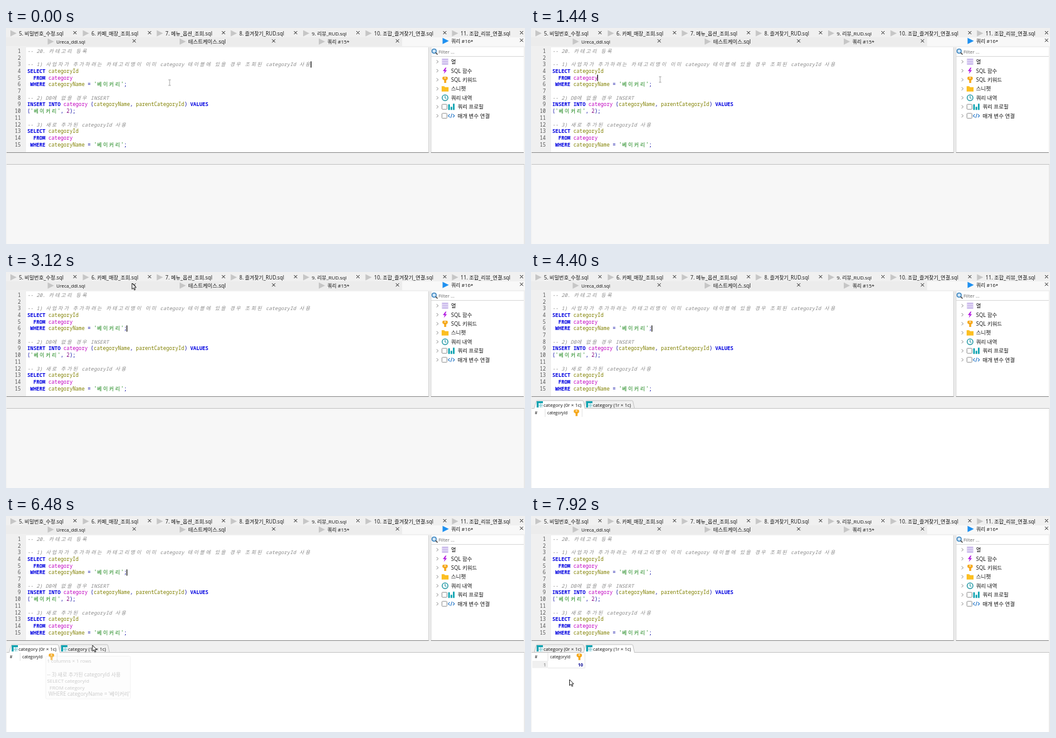
An HTML page for the animation above (8 s loop, 828x346 px).

```html
<!DOCTYPE html>
<html lang="ko">
<head>
<meta charset="utf-8">
<style>
  html, body { margin: 0; width: 100%; height: 100%; overflow: hidden; background: #f0f0f0; }
  svg { display: block; width: 828px; height: 346px; }
  text { font-family: "Open Sans", "Noto Sans CJK KR", "Noto Sans CJK", sans-serif; fill: #111; }
  .code text { font: 8.03px "Noto Sans Mono", "Noto Sans CJK KR", "Noto Sans CJK", monospace; }
  .code .comment { fill: #8a8a8a; font-style: italic; }
  .code .key { fill: #0000e0; font-weight: bold; }
  .code .sym { fill: #0000a0; }
  .code .table { fill: #c000c0; }
  .code .name { fill: #808000; }
  .code .str { fill: #108010; }
  .code .num { fill: #800080; }
  .code .line { fill: #555; text-anchor: end; }
  .tip rect { fill: #f9f9f9; stroke: #dedede; }
  .tip text { fill: #575757; white-space: pre; }
</style>
</head>
<body>
<svg id="stage" viewBox="0 0 828 346"></svg>
<script>
const CELL = 4.815, LINE = 10.71, LEFT = 34;
const hangul = /[가-힣]/;

const rect = (x, y, w, h, fill, extra = '') =>
  `<rect x="${x}" y="${y}" width="${w}" height="${h}" fill="${fill}" ${extra}/>`;
const path = (d, fill, stroke = 'none', extra = '') =>
  `<path d="${d}" fill="${fill}" stroke="${stroke}" ${extra}/>`;
const label = (x, y, s, size = hangul.test(s) ? 8.2 : 7.7, extra = '') =>
  `<text x="${x}" y="${y}" font-size="${size}" ${extra}>${s}</text>`;
const group = (id, body, extra = '') => `<g id="${id}" ${extra}>${body}</g>`;

// File tabs: [triangle x, close x, title, font size]
const row1 = [
  [7, 110, '5. 비밀번호_수정.sql'], [122.5, 229, '6. 카페_매장_조회.sql'],
  [240.5, 347, '7. 메뉴_옵션_조회.sql'], [358.5, 462, '8. 즐겨찾기_RUD.sql', 8.05],
  [474, 561.5, '9. 리뷰_RUD.sql', 7.9], [573.5, 700, '10. 조합_즐겨찾기_연결.sql'],
  [711.5, 822.5, '11. 조합_리뷰_연결.sql']];
const row2 = [
  [66.5, 204.5, 'Ureca_ddl.sql', 7.4], [277, 427, '테스트케이스.sql', 8.4],
  [499, 624.5, '쿼리 #15*', 7.9], [696.5, 822.5, '쿼리 #16*', 7.9]];

function fileTab([x, close, title, size], y, active) {
  return path(`M${x} ${y - 5}l10 5-10 5z`, active ? '#1e90f0' : '#c6c6c6')
    + label(x + 13.8, y + 3.3, title, size)
    + path(`M${close - 2.5} ${y - 3.5}l5 5m0-5l-5 5`, 'none', '#222');
}

const sql = `-- 20. 카테고리 등록

-- 1) 사업자가 추가하려는 카테고리명이 이미 category 테이블에 있을 경우 조회된 categoryId 사용
SELECT categoryId
  FROM category
 WHERE categoryName = '베이커리';

-- 2) DB에 없을 경우 INSERT
INSERT INTO category (categoryName, parentCategoryId) VALUES
('베이커리', 2);

-- 3) 새로 추가된 categoryId 사용
SELECT categoryId
  FROM category
 WHERE categoryName = '베이커리';`.split('\n');

function kind(s) {
  if (s.startsWith('--')) return 'comment';
  if (s[0] === "'") return 'str';
  if (/^\d/.test(s)) return 'num';
  if (/^[A-Z]+$/.test(s)) return 'key';
  if (s === 'category') return 'table';
  return /^\w/.test(s) ? 'name' : 'sym';
}

// Hangul takes two cells of the code grid
function codeLine(line, i) {
  const y = 39.8 + i * LINE;
  let col = 0;
  const xs = [...line].map(c => {
    const wide = hangul.test(c), x = LEFT + col * CELL + (wide ? .6 : 0);
    col += wide ? 2 : 1;
    return x.toFixed(2);
  });
  let out = `<text class="line" x="23.5" y="${y}">${i + 1}</text>`;
  for (const m of line.matchAll(/--.*|'[^']*'|\w+|[^\s\w]/g)) {
    const x = xs.slice(m.index, m.index + m[0].length).join(' ');
    out += `<text class="${kind(m[0])}" x="${x}" y="${y}">${m[0]}</text>`;
  }
  return out;
}

const keyIcon = (x, y) =>
  path(`M${x - 3} ${y - 5}h6l1.2 1.2v3l-2.4 2v4h-3.200v-4l-2.800-2v-3z`, '#f5a81c')
  + rect(x - 1.2, y - 3.6, 2.4, 1.4, '#fff');
const tableIcon = (x, y) =>
  rect(x, y, 10, 10, '#d5eef2') + rect(x, y, 10, 3, '#0fa3b1') + rect(x, y, 3, 10, '#0fa3b1')
  + path(`M${x + 3} ${y + 6.5}h7m-3.5-3.5v7`, 'none', '#7cc9d2', 'stroke-width=".8"');

function sidebar() {
  const items = ['열', 'SQL 함수', 'SQL 키워드', '스니펫', '쿼리 내역', '쿼리 프로필', '매개 변수 연결'];
  const icons = [
    y => rect(695.5, y - 5, 10, 10, '#cdbdec') + path(`M695.5 ${y - 1.7}h10m-10 3.4h10`, 'none', '#eee8fa'),
    y => path(`M701 ${y - 5}l-4 5.5h2.8l-1.3 4.5 5-6h-2.8l2-4z`, '#b41fe0'),
    y => keyIcon(700.5, y),
    y => path(`M695 ${y - 4}h4l1.5 1.5h5.5v7h-11z`, '#fcbf22'),
    y => `<circle cx="700.5" cy="${y}" r="4.6" fill="#eef8fa" stroke="#13909c" stroke-width="1.3"/>`
      + path(`M700.5 ${y - 3}v3.2l2 1.3`, 'none', '#13909c'),
    y => rect(705.5, y - 4, 2.6, 9, '#0fa3b1') + rect(709.3, y, 2.6, 5, '#0fa3b1') + rect(713, y - 5, 2.6, 10, '#0fa3b1'),
    y => path(`M708 ${y - 2.5}l-2.5 2.5 2.5 2.5m5-5l2.5 2.5-2.5 2.5m-1.5-6l-2 7`, 'none', '#2878c8', 'stroke-width="1.1"')
  ];
  return items.map((s, i) => {
    const y = 54 + i * 14.45, boxed = i > 4;
    return path(`M687 ${y - 2.5}l2.5 2.5-2.5 2.5`, 'none', '#777', 'stroke-width=".9"')
      + (boxed ? rect(695.5, y - 4, 8, 8, '#fff', 'stroke="#777" stroke-width=".8" rx="1"') : '')
      + icons[i](y) + label(boxed ? 720.5 : 710, y + 3.1, s, 8.5);
  }).join('');
}

const resultTab = (x, w, s, active) =>
  path(`M${x} 218.5l3.5-11.5q.5-1 1.5-1h${w - 9}q1 0 1.5 1l2.5 11.5`, active ? '#fff' : '#f0f0f0', '#b8b8b8', 'stroke-width=".8"')
  + tableIcon(x + 4, 207) + label(x + 15, 215.8, s, 7.6);

function grid(active, shift) {
  const tabs = [resultTab(5, 81, 'category (0r × 1c)', active === 0), resultTab(84, 81, 'category (1r × 1c)', active === 1)];
  return tabs[1 - active] + tabs[active]
    + label(6, 228, '#', 6.6) + label(26 + shift, 228, 'categoryId', 6.6) + keyIcon(72.5 + shift, 225.5)
    + path(`M${22.5 + shift} 219v13m59-13v13`, 'none', '#e4e4e4');
}

const tip = (id, x, y, w, h, lines) =>
  group(id, `<rect x="${x}" y="${y}" width="${w}" height="${h}" rx="2"/>` + lines, 'class="tip"');

const stage = document.getElementById('stage');
stage.innerHTML =
  rect(0, 0, 828, 346, '#f0f0f0') + rect(0, 15, 632, 14, '#ececec') + rect(632, 15, 196, 14, '#f8f8f8')
  + row1.map(t => fileTab(t, 8.5)).join('')
  + row2.map((t, i) => fileTab(t, i === 3 ? 20.7 : 21.7, i === 3)).join('')
  + rect(32, 31, 642, 168, '#fff') + rect(1, 199, 673.5, 1, '#8c8c8c') + rect(674, 31, 1, 168, '#ccc')
  + group('code', sql.map(codeLine).join(''), 'class="code"')
  + rect(678, 31, 148, 168, '#fff') + rect(677.5, 31, 1, 168, '#d0d0d0') + rect(678, 199, 148, 1, '#8c8c8c')
  + rect(678, 45, 148, 1, '#d8d8d8')
  + '<circle cx="683" cy="37" r="3.4" fill="#cfe6f8" stroke="#2878b8" stroke-width="1.3"/>'
  + path('M685.5 39.5l3 3', 'none', '#444', 'stroke-width="1.6"')
  + label(690, 40.6, 'Filter ...', 7.5, 'style="fill:#666"')
  + sidebar()
  + group('empty', rect(1, 219, 826, 127, '#f7f7f7'))
  + group('results', rect(1, 219, 826, 127, '#fff')
    + group('first', grid(0, 0))
    + group('second', grid(1, 4.5) + rect(2, 232, 25, 11.5, '#f0f0f0')
      + label(24, 240.8, '1', 6.8, 'text-anchor="end" style="fill:#555"')
      + label(83, 240.8, '10', 7, 'text-anchor="end" font-weight="bold" style="fill:#000090"')
      + path('M27 243.5h59v-11.5', 'none', '#e8e8e8')))
  + rect(1, 218, 826, 1, '#c4c4c4') + rect(826.5, 219, 1, 127, '#ddd')
  + group('gap', rect(5.5, 217.6, 80, 1.6, '#fff'))
  + tip('tip1', -132.5, 224.5, 364, 89,
    label(229, 277.7, sql[2], 8.45, 'text-anchor="end"') + label(5.5, 309.3, " WHERE categoryName = '베이커리'", 8.15, 'text-anchor="end"'))
  + tip('tip2', 63.5, 224.5, 135, 68.5,
    ['1 columns × 1 rows', '', sql[11], sql[12], sql[13], sql[14].slice(0, -1)]
      .map((s, i) => label(65.5, 235.2 + i * 10.65, s, hangul.test(s) ? 8.3 : 7.9)).join(''))
  + group('caret', rect(0, 0, 1.2, 10, '#000'))
  + group('beam', path('M-2-4.5h4m-2 0v9m-2 0h4', 'none', '#999', 'stroke-width=".8"'))
  + group('arrow', path('M0 0v9.5l2.2-2 1.6 3.5 1.5-.7-1.6-3.3h3z', '#fff', '#111', 'stroke-width=".9" stroke-linejoin="round"'));

const el = id => document.getElementById(id);
const show = (id, on) => el(id).style.display = on ? '' : 'none';
const move = (id, x, y) => el(id).setAttribute('transform', `translate(${x} ${y})`);
const clamp = v => Math.min(1, Math.max(0, v));
const fade = (t, from, to, len = 200) => clamp((t - from) / len) * clamp((to + len - t) / len);

// Pointer stops: [ms, x, y]
const stops = [
  [0, 261, 87.5], [500, 261, 87.5], [1150, 206, 82.5], [1700, 206, 82.5], [1950, 205, 91], [2250, 205, 90],
  [2650, 202, 19], [3150, 201, 18], [3450, 190, -20], [4500, 150, -20], [4850, 53.5, 213.5], [5750, 53.5, 213.5],
  [6200, 138, 207], [7000, 138, 207], [7600, 61.5, 262], [8000, 61.5, 262]];

function pointer(t) {
  const i = stops.findIndex(s => s[0] > t), a = stops[i - 1], b = stops[i];
  const u = (t - a[0]) / (b[0] - a[0]), e = u * u * (3 - 2 * u);
  return [a[1] + (b[1] - a[1]) * e, a[2] + (b[2] - a[2]) * e];
}

// Caret places: [since ms, line, column]
const carets = [[0, 2, 94], [1200, 4, 15], [1980, 5, 33]];

function draw(t) {
  const [x, y] = pointer(t);
  const inEditor = x > 32 && x < 674 && y > 31 && y < 199;
  move('beam', x, y);
  move('arrow', x, y);
  show('beam', inEditor);
  show('arrow', !inEditor);

  const [since, line, col] = carets.findLast(c => c[0] <= t);
  move('caret', LEFT + col * CELL - .6, 32 + line * LINE);
  show('caret', (t - since) % 1060 < 530);

  const ran = t >= 3840, second = t >= 6800;
  show('empty', !ran);
  show('results', ran);
  show('first', !second);
  show('second', second);
  show('gap', ran);
  move('gap', second ? 79 : 0, 0);
  el('tip1').style.opacity = fade(t, 5080, 5880);
  el('tip2').style.opacity = fade(t, 6420, 7200);
}

function tick() {
  draw(performance.now() % 8000);
  requestAnimationFrame(tick);
}
tick();
</script>
</body>
</html>
```
